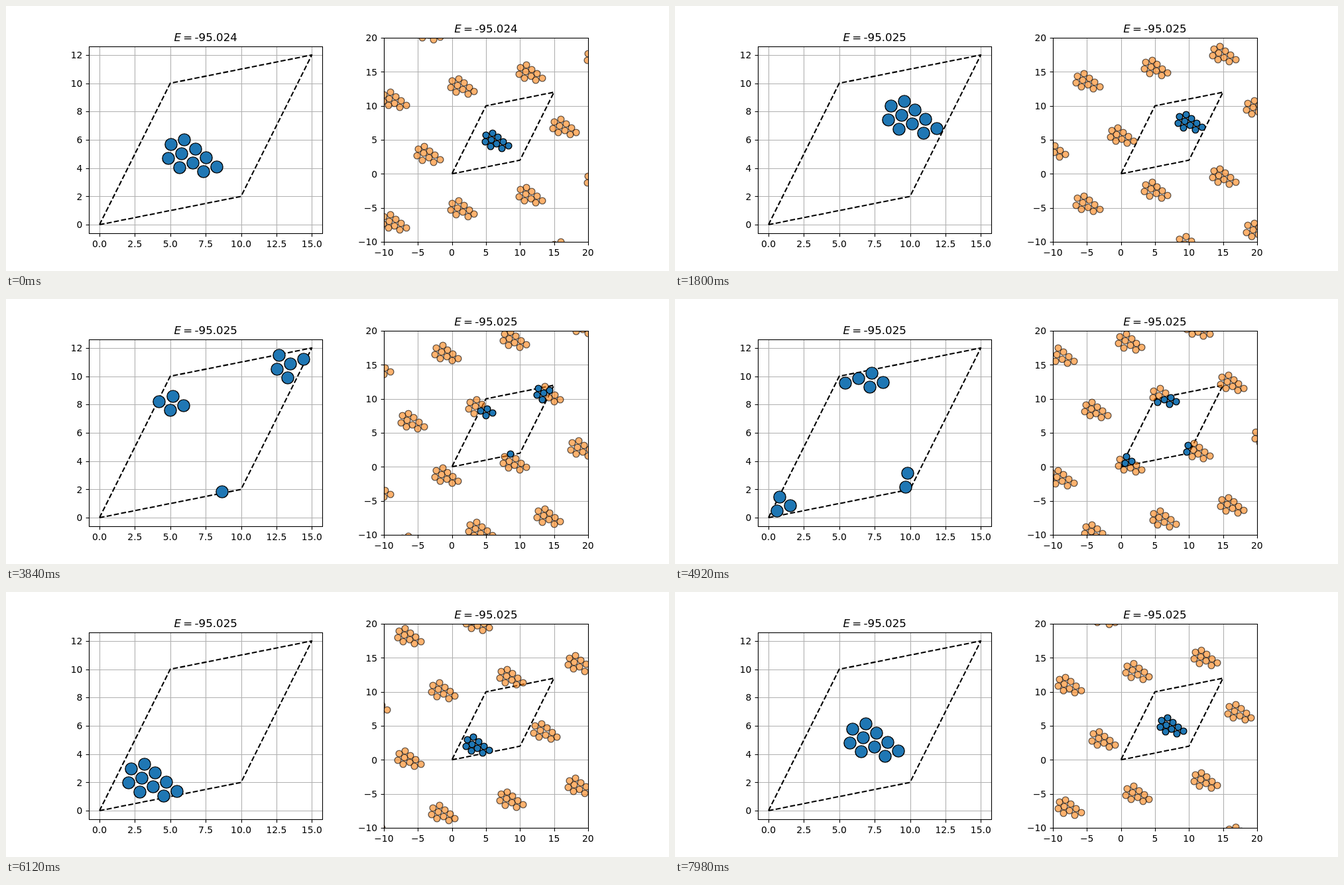
An HTML page with a canvas for the animation above (8 s loop, 1000 by 400 pixels).

```html
<!DOCTYPE html>
<html lang="en">
<head>
<meta charset="utf-8">
<title>Periodic cell</title>
<style>
html, body { margin: 0; height: 100%; overflow: hidden; background: #fff; }
canvas { display: block; }
</style>
</head>
<body>
<canvas id="stage" width="1000" height="400"></canvas>
<script>
const ctx = document.getElementById('stage').getContext('2d');
const FONT = '"DejaVu Sans", sans-serif';
const LOOP = 8000, STEP = 60;
const A = [10, 2], B = [5, 10];            // cell vectors
const DET = A[0] * B[1] - A[1] * B[0];
const START = [6, 6], VELOCITY = [0.1194, 0.0912];
const U = [0.768, -0.641], W = [-0.94, -0.345];   // cluster lattice

const range = (from, to, step = 1) =>
  Array.from({ length: Math.round((to - from) / step) + 1 }, (_, i) => from + i * step);
const combine = (m, a, n, b) => [m * a[0] + n * b[0], m * a[1] + n * b[1]];

// Rows of four, four and two particles
const cluster = [[0, 0, 3], [1, 0, 3], [2, 1, 2]].flatMap(([row, from, to]) =>
  range(from, to).map(n => combine(n, U, row, W)));

const images = range(-2, 2).flatMap(i => range(-2, 2).map(j => [i, j]))
  .filter(([i, j]) => i || j).map(([i, j]) => combine(i, A, j, B));

const left = {
  x: 125, y: 61.1, w: 352.27, h: 281.8, x0: -0.75, y0: -0.6, scale: 21.35,
  xTicks: range(0, 15, 2.5), yTicks: range(0, 12, 2), digits: 1, radius: 9.1
};
const right = {
  x: 569.86, y: 48, w: 308, h: 308, x0: -10, y0: -10, scale: 308 / 30,
  xTicks: range(-10, 20, 5), yTicks: range(-10, 20, 5), digits: 0, radius: 4.9
};

const px = (p, x) => p.x + (x - p.x0) * p.scale;
const py = (p, y) => p.y + p.h - (y - p.y0) * p.scale;
const snap = v => Math.round(v) + 0.5;
const label = (v, digits) => v.toFixed(digits).replace('-', '\u2212');

function line(x1, y1, x2, y2, color) {
  ctx.strokeStyle = color;
  ctx.beginPath();
  ctx.moveTo(x1, y1);
  ctx.lineTo(x2, y2);
  ctx.stroke();
}

function drawGrid(p) {
  const l = snap(p.x), r = snap(p.x + p.w), t = snap(p.y), b = snap(p.y + p.h);
  ctx.lineWidth = 1.11;
  ctx.font = '13.89px ' + FONT;
  ctx.fillStyle = '#000';
  ctx.textAlign = 'center';
  for (const v of p.xTicks) {
    const x = snap(px(p, v));
    line(x, t, x, b, '#b0b0b0');
    line(x, b, x, b + 4.86, '#000');
    ctx.fillText(label(v, p.digits), px(p, v), Math.round(p.y + p.h + 20.9));
  }
  ctx.textAlign = 'right';
  for (const v of p.yTicks) {
    const y = snap(py(p, v));
    line(l, y, r, y, '#b0b0b0');
    line(l, y, l - 4.86, y, '#000');
    ctx.fillText(label(v, 0), p.x - 9.7, Math.round(py(p, v) + 5.2));
  }
}

function drawCell(p) {
  ctx.lineWidth = 2.08;
  ctx.lineJoin = 'round';
  ctx.strokeStyle = '#000';
  ctx.setLineDash([7.71, 3.33]);
  ctx.beginPath();
  for (const [i, j] of [[0, 0], [1, 0], [1, 1], [0, 1], [0, 0]]) {
    const [x, y] = combine(i, A, j, B);
    ctx.lineTo(px(p, x), py(p, y));
  }
  ctx.stroke();
  ctx.setLineDash([]);
}

function drawParticles(p, points, color, alpha = 1) {
  ctx.globalAlpha = alpha;
  ctx.fillStyle = color;
  ctx.strokeStyle = '#000';
  ctx.lineWidth = 1.39;
  for (const [x, y] of points) {
    ctx.beginPath();
    ctx.arc(Math.round(px(p, x)), Math.round(py(p, y)), p.radius, 0, 2 * Math.PI);
    ctx.fill();
    ctx.stroke();
  }
  ctx.globalAlpha = 1;
}

function drawTitle(p, energy) {
  const size = 16.67, gap = 0.2 * size;
  const parts = [['E', 'italic '], ['=', ''], [energy, '']].map(([text, style]) => {
    const font = style + size + 'px ' + FONT;
    ctx.font = font;
    return { text, font, width: ctx.measureText(text).width };
  });
  const total = parts.reduce((sum, part) => sum + part.width, 2 * gap);
  let x = p.x + p.w / 2 - total / 2;
  ctx.fillStyle = '#000';
  ctx.textAlign = 'left';
  for (const part of parts) {
    ctx.font = part.font;
    ctx.fillText(part.text, x, Math.round(p.y - 8.3));
    x += part.width + gap;
  }
}

function drawPanel(p, points, copies, energy) {
  drawGrid(p);
  ctx.save();
  ctx.beginPath();
  ctx.rect(p.x, p.y, p.w, p.h);
  ctx.clip();
  drawCell(p);
  drawParticles(p, copies, '#ff7f0e', 0.6);
  drawParticles(p, points, '#1f77b4');
  ctx.restore();
  ctx.strokeStyle = '#000';
  ctx.lineWidth = 1.11;
  ctx.lineJoin = 'miter';
  const l = snap(p.x), t = snap(p.y);
  ctx.strokeRect(l, t, snap(p.x + p.w) - l, snap(p.y + p.h) - t);
  drawTitle(p, energy);
}

function wrap([x, y]) {
  const i = Math.floor((x * B[1] - y * B[0]) / DET);
  const j = Math.floor((y * A[0] - x * A[1]) / DET);
  const [dx, dy] = combine(i, A, j, B);
  return [x - dx, y - dy];
}

function render() {
  const k = Math.floor(performance.now() % LOOP / STEP);
  const origin = combine(1, START, k, VELOCITY);
  const points = cluster.map(c => wrap(combine(1, origin, 1, c)));
  const copies = images.flatMap(shift => points.map(pt => combine(1, pt, 1, shift)));
  const energy = k % 9 ? '-95.025' : '-95.024';
  ctx.fillStyle = '#fff';
  ctx.fillRect(0, 0, 1000, 400);
  drawPanel(left, points, [], energy);
  drawPanel(right, points, copies, energy);
  requestAnimationFrame(render);
}
render();
</script>
</body>
</html>
```
